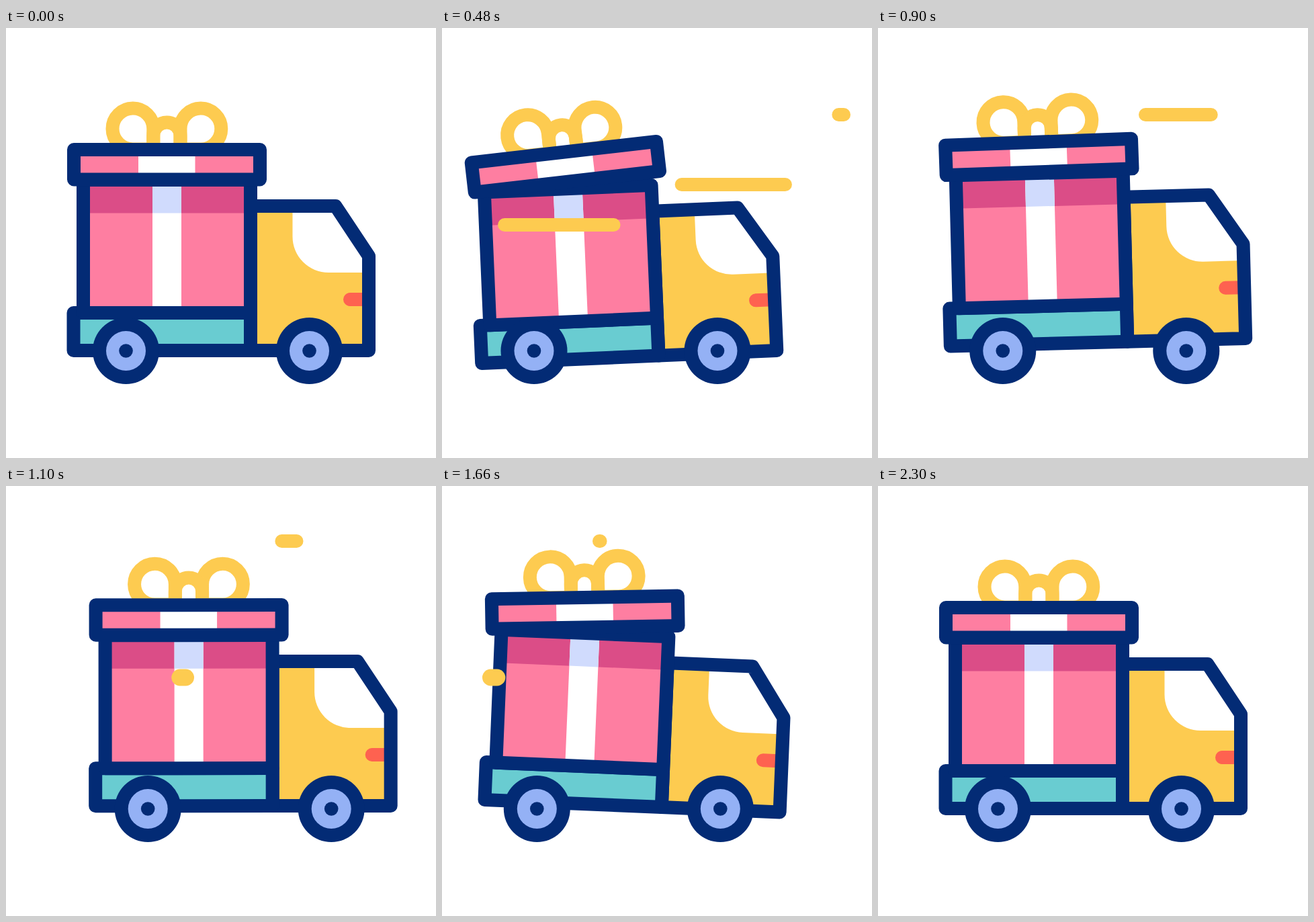
An HTML page for the animation above (2.4 s loop, 640x640 px).

```html
<!DOCTYPE html>
<html lang="en">
<head>
<meta charset="utf-8">
<title>Gift delivery truck</title>
<style>
  html, body { margin: 0; width: 100%; height: 100%; overflow: hidden; background: #fff; }
  svg { display: block; width: 100%; height: 100%; }
  .ink { stroke: #032b75; stroke-width: 20; stroke-linejoin: round; stroke-linecap: round; }
  .gold { fill: none; stroke: #fdcb50; stroke-width: 20; }
  .pink { fill: #fe7ea1; }
  .none { fill: none; }
  #lines path { stroke-linecap: round; }
</style>
</head>
<body>
<svg viewBox="0 0 640 640">
  <g id="body">
    <path fill="#fdcb50" d="M364 265H490.500L540 339.500V480H364Z"/>
    <path fill="#fff" d="M426.500 270V310.500A53.500 53.500 0 0 0 480 364H540V339.500L490.500 265Z"/>
    <path fill="#fe6250" d="M535 394H512a10 10 0 0 0 0 20h23Z"/>
    <path class="ink none" d="M364 265H490.500L540 339.500V480H364Z"/>
    <path fill="#69ccd1" class="ink" d="M100.500 424H364V480H100.500Z"/>
    <path class="pink" d="M115 226H364V424H115Z"/>
    <path fill="#db4d87" d="M115 226H364V275.500H115Z"/>
    <path fill="#fff" d="M218 226H261V424H218Z"/>
    <path fill="#d0dbfd" d="M218 226H261V275.500H218Z"/>
    <path class="ink none" d="M115 226H364V424H115Z"/>
    <g id="lid">
      <g class="gold">
        <path d="M219.300 181V150A30.400 30.400 0 1 0 189 180.400H219.300"/>
        <path d="M259.500 181V150A30.400 30.400 0 1 1 290 180.400H259.500"/>
        <path d="M219.300 181V160.500A20.100 20.100 0 0 1 259.500 160.500V181"/>
      </g>
      <path class="pink" d="M101 181H378V225.500H101Z"/>
      <path fill="#fff" d="M197 181H281.500V225.500H197Z"/>
      <path class="ink none" d="M101 181H378V225.500H101Z"/>
    </g>
  </g>
  <g id="wheels"></g>
  <g id="lines" class="gold"></g>
</svg>
<script>
const LOOP = 2400;
const NS = "http://www.w3.org/2000/svg";
const $ = id => document.getElementById(id);

function add(parent, tag, attrs) {
  const el = document.createElementNS(NS, tag);
  for (const k in attrs) el.setAttribute(k, attrs[k]);
  return parent.appendChild(el);
}

const smooth = u => {
  u = Math.min(1, Math.max(0, u));
  return u * u * (3 - 2 * u);
};

// Each key is [time, value].
function segment(keys, t) {
  let i = 0;
  while (i < keys.length - 2 && t >= keys[i + 1][0]) i++;
  return i;
}

// Eases to a stop at every key.
function stops(keys, t) {
  const i = segment(keys, t);
  const [t0, a] = keys[i], [t1, b] = keys[i + 1];
  return a + (b - a) * smooth((t - t0) / (t1 - t0));
}

// Passes through the keys on a smooth curve.
function flow(keys, t) {
  const last = keys.length - 1;
  if (t >= keys[last][0]) return keys[last][1];
  const slope = j => j <= 0 || j >= last ? 0 :
    (keys[j + 1][1] - keys[j - 1][1]) / (keys[j + 1][0] - keys[j - 1][0]);
  const i = segment(keys, t);
  const [t0, a] = keys[i], [t1, b] = keys[i + 1];
  const d = t1 - t0, u = (t - t0) / d, v = 1 - u;
  return a + (b - a) * smooth(u) + d * u * v * (v * slope(i) - u * slope(i + 1));
}

const drive = [[0, 0], [580, -45], [1100, 32.7], [1645, -37.3], [2165, 0], [LOOP, 0]];
const lift = [[0, 0], [280, 7], [440, 9.5], [540, 8.5], [680, 2.5], [900, -12.2],
  [1300, 5], [1660, -3.8], [2180, -0.6], [2300, 0]];
const tilt = [[0, 0], [280, -1.3], [580, -2.95], [680, -3], [900, -1.5], [1300, 1.33],
  [1560, 2.4], [1660, 2.4], [2080, 0.1], [2180, 0], [2300, 0]];
const open = [[0, 0], [290, 0], [620, -6.6], [960, 0], [1330, 0], [1645, -3.4],
  [1960, 0], [LOOP, 0]];

for (const cx of [178.5, 451.5]) {
  const put = (r, fill) => add($("wheels"), "circle", { cx, cy: 480.5, r, fill });
  put(49.5, "#032b75");
  put(29.5, "#94b1f5");
  put(10.3, "#032b75");
}

// Speed lines run from right to left: start time, right, left, y, width.
const GROW = 400, LAG = 264;
const streaks = [
  [94, 556, 356, 233, 20],
  [186, 259, 59, 293, 20],
  [434, 598, 398, 129, 20],
  [1018, 432.5, 234, 82, 20],
  [1050, 267.5, 72.5, 285, 25]
].map(([start, right, left, y, width]) => ({
  start, right, left, y,
  el: add($("lines"), "path", { "stroke-width": width, style: `stroke-width:${width}px` })
}));

function draw(t) {
  const x = stops(drive, t);
  $("wheels").setAttribute("transform", `translate(${x} 0)`);
  $("body").setAttribute("transform",
    `translate(${x} ${flow(lift, t)}) rotate(${flow(tilt, t)} 320 480)`);
  $("lid").setAttribute("transform", `rotate(${stops(open, t)} 101 225.5)`);
  for (const s of streaks) {
    const age = t - s.start;
    const on = age > 0 && age < GROW + LAG;
    s.el.setAttribute("visibility", on ? "visible" : "hidden");
    if (!on) continue;
    const at = time => s.right + (s.left - s.right) * smooth(time / GROW);
    s.el.setAttribute("d", `M${at(age - LAG)} ${s.y}H${at(age) - 0.01}`);
  }
}

const begin = performance.now();
function tick() {
  draw((performance.now() - begin) % LOOP);
  requestAnimationFrame(tick);
}
draw(0);
requestAnimationFrame(tick);
</script>
</body>
</html>
```
